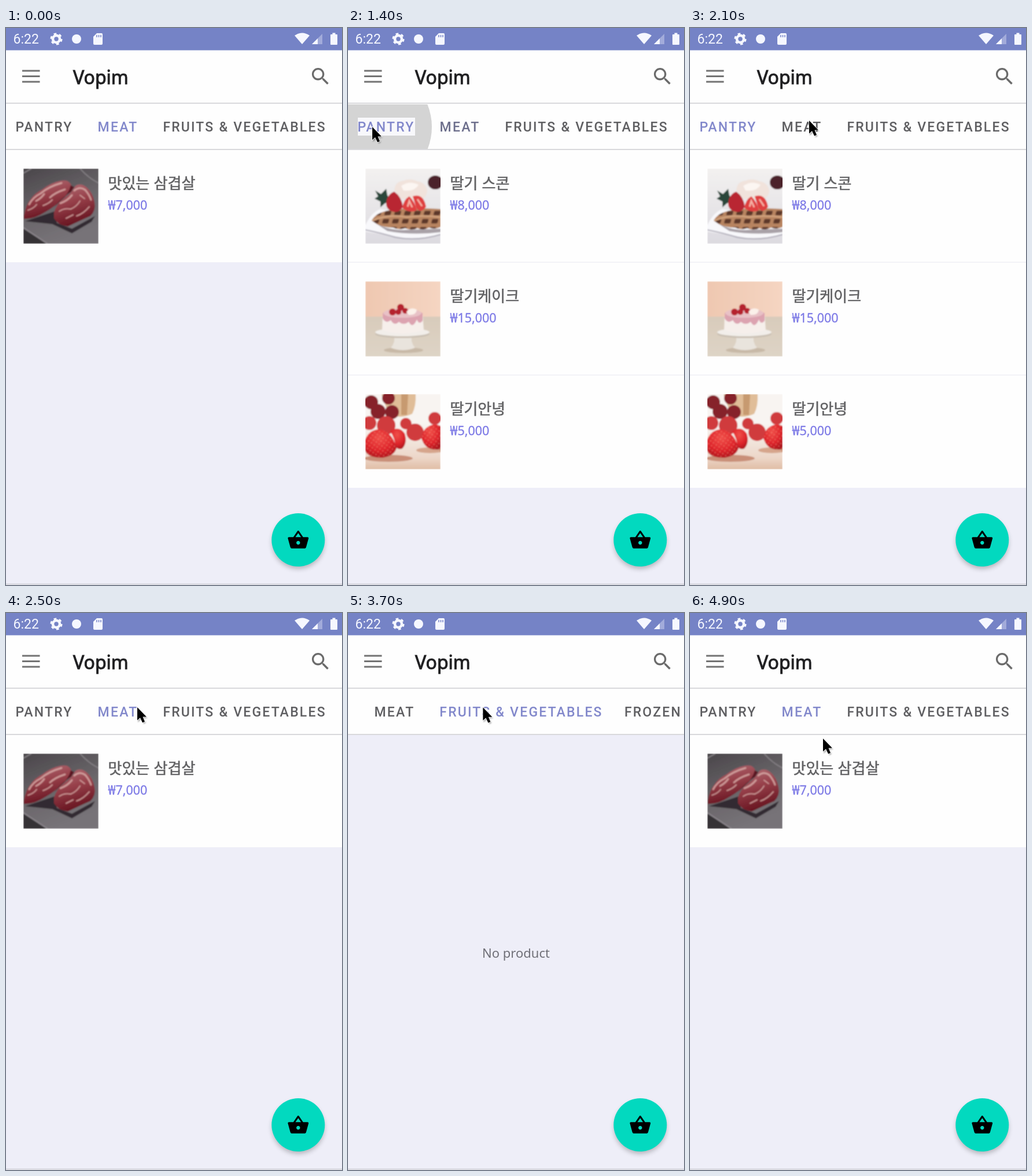
Write an HTML page that moves like this. It is 581 by 963 pixels and loops after 5000 ms.

```html
<!DOCTYPE html>
<html lang="ko">
<head>
<meta charset="utf-8">
<title>Shop categories</title>
<style>
  html, body { margin: 0; width: 100%; height: 100%; overflow: hidden; background: #eeeef8; }
  svg { display: block; }
  #stage { width: 100vw; height: 100vh; }
  .tab { font: 500 23px Roboto, sans-serif; letter-spacing: 2.2px; }
  .title { font: 400 32px "Noto Sans", sans-serif; fill: #202022; stroke: #202022; stroke-width: 1; }
  .name { font: 400 26px "Noto Sans CJK KR", "Noto Sans CJK", "Noto Sans CJK JP", sans-serif;
    fill: #626264; stroke: #626264; stroke-width: .6; }
  .price { font: 400 21.5px "Noto Sans", sans-serif; fill: #7d7ae6; stroke: #7d7ae6; stroke-width: .3; }
  .won { font-family: "Noto Sans Mono", monospace; }
</style>
</head>
<body>
<svg id="stage" viewBox="0 0 581 963" preserveAspectRatio="none">
  <defs>
    <clipPath id="bar"><rect y="132" width="581" height="77"/></clipPath>
    <filter id="soft" x="-30%" y="-30%" width="160%" height="160%"><feGaussianBlur stdDeviation="4"/></filter>
    <filter id="blur"><feGaussianBlur stdDeviation="1"/></filter>
    <linearGradient id="slate" x2=".4" y2="1"><stop stop-color="#4a464a"/><stop offset=".6" stop-color="#6b676b"/><stop offset="1" stop-color="#777378"/></linearGradient>
    <linearGradient id="flesh" x2=".3" y2="1"><stop stop-color="#b5737a"/><stop offset=".5" stop-color="#963f49"/><stop offset="1" stop-color="#681521"/></linearGradient>
    <linearGradient id="table" x2="0" y2="1"><stop stop-color="#f3f1f0"/><stop offset="1" stop-color="#dcdae0"/></linearGradient>
    <linearGradient id="wall"><stop stop-color="#efc8b1"/><stop offset="1" stop-color="#f5d5c2"/></linearGradient>
    <linearGradient id="floor" x2="0" y2="1"><stop stop-color="#d8cbbb"/><stop offset="1" stop-color="#ded4c6"/></linearGradient>
    <linearGradient id="wood" x2="0" y2="1"><stop offset=".4" stop-color="#f8f4f1"/><stop offset=".85" stop-color="#ecd6c8"/><stop offset="1" stop-color="#e0bda5"/></linearGradient>
    <radialGradient id="ripe" cx=".45" cy=".3" r=".75"><stop stop-color="#f0504a"/><stop offset=".6" stop-color="#de252b"/><stop offset="1" stop-color="#a9141d"/></radialGradient>
    <pattern id="grid" width="17" height="14" patternUnits="userSpaceOnUse" patternTransform="skewX(-15)">
      <rect width="17" height="14" fill="#b88461"/><rect x="3" y="3" width="11" height="8" rx="2" fill="#5d382a"/>
    </pattern>
    <pattern id="seeds" width="6" height="6" patternUnits="userSpaceOnUse" patternTransform="rotate(35)">
      <circle cx="3" cy="3" r=".9" fill="#ffb49a" opacity=".6"/>
    </pattern>

    <g id="meat" filter="url(#blur)">
      <rect width="130" height="130" fill="url(#slate)"/>
      <path d="M98 0Q112 16 130 25M0 8L14 0" fill="none" stroke="#8b878b" stroke-width="1.5"/>
      <path d="M0 104L40 130H0Z" fill="#343135"/>
      <path d="M0 102L42 130" stroke="#969196" stroke-width="1.5"/>
      <path d="M3 91Q30 82 54 74L58 94L84 104L124 82L118 92L84 112L50 96Z" fill="#332c31"/>
      <path d="M1 82Q4 64 12 54Q20 42 33 36Q48 24 65 21Q80 18 83 30Q80 44 66 54Q54 66 38 75Q18 88 1 87Z" fill="url(#flesh)"/>
      <path d="M53 76Q58 60 70 52Q84 42 90 30Q99 24 110 33Q120 42 123 58Q126 72 116 82Q98 90 77 100Q60 98 53 86Z" fill="url(#flesh)"/>
      <path d="M54 66Q66 50 83 40Q86 34 88 32L82 29Q78 44 66 54Z" fill="#5a1822"/>
      <g fill="none" stroke="#dfb6b1" stroke-linecap="round" opacity=".75">
        <path d="M10 62Q16 50 30 43Q44 31 66 25M22 56Q30 52 36 44M46 50Q54 42 72 36M88 38Q98 30 107 37Q114 45 117 54M64 60Q76 56 84 46" stroke-width="3"/>
        <path d="M8 72Q18 69 23 62M34 64Q45 60 50 54M62 74Q70 68 82 70Q92 66 98 56M92 82Q104 78 114 66M98 46L106 52M74 86L86 80" stroke-width="2"/>
      </g>
    </g>

    <g id="waffle" filter="url(#blur)">
      <rect width="130" height="130" fill="url(#table)"/>
      <path d="M0 98Q10 76 26 70L130 88V113Q90 126 52 117L0 109Z" fill="#f8f8fb"/>
      <path d="M0 106Q30 112 52 119Q90 126 130 114" fill="none" stroke="#b0adb9" stroke-width="2"/>
      <path d="M14 92Q40 108 70 106L130 104V110Q80 116 38 108Z" fill="#a9a2a8"/>
      <ellipse cx="121" cy="24" rx="13" ry="12" fill="#4b2029"/>
      <path d="M11 90Q18 76 42 72Q80 66 130 70V101Q120 106 110 102Q101 108 90 103Q80 108 69 103Q58 107 48 102Q32 102 20 96Z" fill="url(#grid)"/>
      <path d="M12 90Q40 78 72 84Q100 80 130 84" fill="none" stroke="#d0a17c" stroke-width="3"/>
      <path d="M50 37Q52 22 66 21Q78 16 90 22Q104 24 107 38Q106 52 92 54L62 52Z" fill="#f1e3dc"/>
      <path d="M62 30Q76 20 92 28Q86 40 66 38Z" fill="#fcf6f2"/>
      <path d="M17 38L27 44L36 35L38 46L44 56L34 60L26 67L26 57L16 52L22 48Z" fill="#29473b"/>
      <path d="M36 60Q38 44 50 40Q62 48 65 66Q58 78 46 74Q36 70 36 60Z" fill="#b92831"/>
      <path d="M64 68Q66 54 76 48Q86 58 89 72Q76 78 64 68ZM82 48Q100 42 105 66Q96 79 88 68Z" fill="#df3f41"/>
      <path d="M73 66L76 56L81 67M90 53L98 65" fill="none" stroke="#f6b1a5" stroke-width="3"/>
    </g>

    <g id="cake" filter="url(#blur)">
      <rect width="130" height="130" fill="url(#wall)"/>
      <rect y="61" width="130" height="69" fill="url(#floor)"/>
      <ellipse cx="66" cy="119" rx="34" ry="5" fill="#c8b9a7"/>
      <path d="M49 94H81Q77 104 86 115Q65 123 44 115Q53 104 49 94Z" fill="#e9e4dd"/>
      <ellipse cx="64" cy="91" rx="47" ry="7" fill="#c9bfb2"/>
      <ellipse cx="64" cy="88" rx="47" ry="7" fill="#f2eeea"/>
      <path d="M30 56H99L101 84Q64 96 29 84Z" fill="#f6efeb"/>
      <path d="M30 55Q64 39 99 55V68Q93 76 89 66Q82 83 75 70Q66 77 58 70Q50 78 44 67Q36 74 30 64Z" fill="#dca3b0"/>
      <ellipse cx="64" cy="55" rx="33" ry="8" fill="#e8c1c6"/>
      <g fill="#b5202f"><circle cx="47" cy="53" r="6"/><circle cx="61" cy="45" r="6"/><circle cx="69" cy="51" r="5"/><circle cx="57" cy="53" r="5"/></g>
      <path d="M71 53Q78 43 89 49Q88 59 75 58Z" fill="#fbf1ea"/>
    </g>

    <g id="berries" filter="url(#blur)">
      <rect width="130" height="130" fill="url(#wood)"/>
      <path d="M28 0H87Q88 20 81 34Q60 44 40 34Z" fill="#e0bd98"/>
      <path d="M62 0H74L72 36H62Z" fill="#c79a70"/>
      <ellipse cx="40" cy="111" rx="42" ry="6" fill="#c98f78"/>
      <ellipse cx="112" cy="97" rx="24" ry="5" fill="#d6a58c"/>
      <g fill="#86212a"><circle cx="10" cy="14" r="12"/><circle cx="40" cy="7" r="11"/><circle cx="22" cy="30" r="13"/><circle cx="46" cy="31" r="12"/></g>
      <g fill="#d03a3e"><circle cx="7" cy="50" r="12"/><circle cx="36" cy="54" r="16"/><circle cx="70" cy="51" r="10"/><circle cx="120" cy="42" r="11"/><circle cx="86" cy="66" r="15"/></g>
      <g id="front" fill="url(#ripe)">
        <path d="M43 64Q58 54 68 68Q73 84 64 94Q56 97 52 90Q51 76 43 64Z"/>
        <path d="M0 78Q8 60 26 61Q46 66 54 92Q52 106 30 110Q4 110 0 98Z"/>
        <path d="M97 76Q100 54 122 52L130 55V95Q104 100 97 76Z"/>
      </g>
      <path d="M0 78Q8 60 26 61Q46 66 54 92Q52 106 30 110Q4 110 0 98ZM97 76Q100 54 122 52L130 55V95Q104 100 97 76Z" fill="url(#seeds)"/>
    </g>
  </defs>

  <rect width="581" height="963" fill="#eeeef8"/>
  <g id="list"></g>
  <text id="empty" x="290.5" y="596" text-anchor="middle" font-family="Noto Sans, sans-serif" font-size="22" fill="#707078">No product</text>

  <rect y="38" width="581" height="172" fill="#fefefe"/>
  <g clip-path="url(#bar)">
    <circle id="ripple" cy="171" fill="#000"/>
    <rect id="plate" x="17" y="155" width="99" height="31" fill="#f8f8fb"/>
    <g id="tabs"></g>
  </g>
  <path d="M0 130H581M0 210H581" stroke="#d9d9dc" stroke-width="2"/>
  <path d="M0 961.5H581" stroke="#d5d5dc" stroke-width="2"/>

  <path d="M28 74H58.5M28 83.5H58.5M28 93H58.5" stroke="#737373" stroke-width="2.8"/>
  <text class="title" x="116" y="96.5">Vopim</text>
  <path transform="translate(524 64) scale(1.65)" fill="#6b6b6b" d="M15.5 14h-.79l-.28-.27C15.41 12.59 16 11.11 16 9.5 16 5.91 13.09 3 9.5 3S3 5.91 3 9.5 5.91 16 9.5 16c1.61 0 3.09-.59 4.23-1.57l.27.28v.79l5 4.99L20.49 19l-4.99-5zm-6 0C7.01 14 5 11.99 5 9.5S7.01 5 9.5 5 14 7.01 14 9.5 11.99 14 9.5 14z"/>

  <rect width="581" height="38.5" fill="#7583c6"/>
  <g fill="#f5f7ff">
    <text x="12.5" y="27" font-family="Roboto, sans-serif" font-size="23">6:22</text>
    <g fill="none" stroke="#f5f7ff">
      <circle cx="87" cy="19" r="6" stroke-width="4.6"/>
      <circle cx="87" cy="19" r="8.8" stroke-width="3.5" stroke-dasharray="4.6 4.615"/>
    </g>
    <circle cx="122" cy="19" r="8"/>
    <path d="M157 9H165Q167 9 167 11V27Q167 29 165 29H153Q151 29 151 27V15Z"/>
    <path d="M157 12V16M160.5 12V16M164 12V16" stroke="#7583c6" stroke-width="1.5"/>
    <path d="M499 13Q512 4 525 13L512 28Z"/>
    <path d="M547 10V28H529Z" opacity=".35"/>
    <path d="M539 18V28H529Z"/>
    <path d="M564.5 8.5H569.5V11H572Q573 11 573 12V28Q573 29 572 29H562Q561 29 561 28V12Q561 11 562 11H564.5Z"/>
  </g>

  <circle cx="505.3" cy="890" r="45" opacity=".25" filter="url(#soft)"/>
  <circle cx="505.3" cy="885" r="46" fill="#02d9bf"/>
  <path transform="translate(485.8 865.7) scale(1.625)" d="M17.21 9l-4.38-6.56c-.19-.28-.51-.42-.83-.42-.32 0-.64.14-.83.43L6.79 9H2c-.55 0-1 .45-1 1 0 .09.01.18.04.27l2.54 9.27c.23.84 1 1.46 1.92 1.46h13c.92 0 1.69-.62 1.93-1.46l2.54-9.27L23 10c0-.55-.45-1-1-1h-4.79zM9 9l3-4.4L15 9H9zm3 8c-1.1 0-2-.9-2-2s.9-2 2-2 2 .9 2 2-.9 2-2 2z"/>

  <g id="cursor">
    <path d="M1 3V26L7 21L11 29L15 27L11 19H18Z" opacity=".3" filter="url(#blur)"/>
    <path d="M0 0V22.5L5 18L9 26.5L13 25L9.500 16.500H16Z" stroke="#fff" stroke-width="1.500" paint-order="stroke"/>
  </g>
</svg>

<script>
const $ = id => document.getElementById(id);
const LOOP = 5000, STEP = 100;
const IDLE = [95, 95, 98], ACTIVE = [130, 136, 203];

const tabs = [["PANTRY", 16.4], ["MEAT", 158.6], ["FRUITS & VEGETABLES", 271.4], ["FROZEN", 591]];
const products = [
  [["waffle", "딸기 스콘", "8,000"], ["cake", "딸기케이크", "15,000"], ["berries", "딸기안녕", "5,000"]],
  [["meat", "맛있는 삼겹살", "7,000"]],
  []
];
// time, tab, x of the tap
const taps = [[-1000, 1, 0], [1250, 0, 42], [2250, 1, 222], [2750, 2, 335], [4650, 1, 203]];
// time, values
const pointer = [[400, 180, 290], [800, 42, 171], [1500, 42, 171], [2100, 206, 160], [2300, 226, 165],
  [2500, 227, 163], [2750, 335, 166], [3100, 344, 162], [3600, 225, 165], [4200, 338, 141],
  [4500, 203, 171], [4700, 206, 172], [4900, 230, 217]];
const scroll = [[2800, 0], [3050, 121.5], [3600, 121.5], [4200, 8], [4300, 0]];

const clamp = v => Math.max(0, Math.min(1, v));
const mix = (a, b, k) => a.map((v, i) => v + (b[i] - v) * k);

function along(keys, t) {
  let i = 0;
  while (i < keys.length - 2 && t >= keys[i + 1][0]) i++;
  const [t0, ...a] = keys[i], [t1, ...b] = keys[i + 1];
  const k = clamp((t - t0) / (t1 - t0));
  return mix(a, b, k * k * (3 - 2 * k));
}

const row = ([photo, name, price], i) => `<g transform="translate(0 ${i * 195})">
  <rect y="210" width="581" height="195" fill="#fefefe"/>
  ${i ? '<path d="M0 210H581" stroke="#f3f3f7" stroke-width="2"/>' : ""}
  <svg x="30" y="243" width="130" height="130"><use href="#${photo}"/></svg>
  <text class="name" x="176.5" y="278">${name}</text>
  <text class="price" x="176.5" y="314"><tspan class="won">₩</tspan>${price}</text></g>`;

$("list").innerHTML = products.map(p => `<g>${p.map(row).join("")}</g>`).join("");
$("tabs").innerHTML = tabs.map(([label, x]) =>
  `<text class="tab" x="${x}" y="179">${label.replace("&", "&amp;")}</text>`).join("");
const pages = [...$("list").children], labels = [...$("tabs").children];

function draw(t) {
  const switched = taps.filter(tap => tap[0] + 50 <= t);
  const [since, active] = switched.at(-1);
  const previous = switched.length > 1 ? switched.at(-2)[1] : -1;
  const fade = clamp((t - since) / 250);

  pages.forEach((page, i) => page.style.display = i === active ? "" : "none");
  $("empty").style.display = products[active].length ? "none" : "";
  labels.forEach((label, i) => {
    const color = i === active ? ACTIVE : i === previous ? mix(ACTIVE, IDLE, fade) : IDLE;
    label.style.fill = `rgb(${color.map(Math.round)})`;
  });
  $("tabs").setAttribute("transform", `translate(${-along(scroll, t)[0]} 0)`);

  const [start, tab, x] = taps.filter(tap => tap[0] <= t).at(-1);
  const age = t - start, strength = clamp((250 - age) / 100);
  $("ripple").setAttribute("cx", x);
  $("ripple").setAttribute("r", 103 * clamp(age / 150));
  $("ripple").setAttribute("opacity", 0.165 * strength);
  $("plate").setAttribute("opacity", tab === 0 ? strength : 0);

  $("cursor").style.display = t < pointer[0][0] ? "none" : "";
  $("cursor").setAttribute("transform", `translate(${along(pointer, t)})`);
}

const begin = performance.now();
function tick() {
  const t = (performance.now() - begin) % LOOP;
  draw(Math.floor(t / STEP) * STEP);
  requestAnimationFrame(tick);
}
tick();
</script>
</body>
</html>
```
